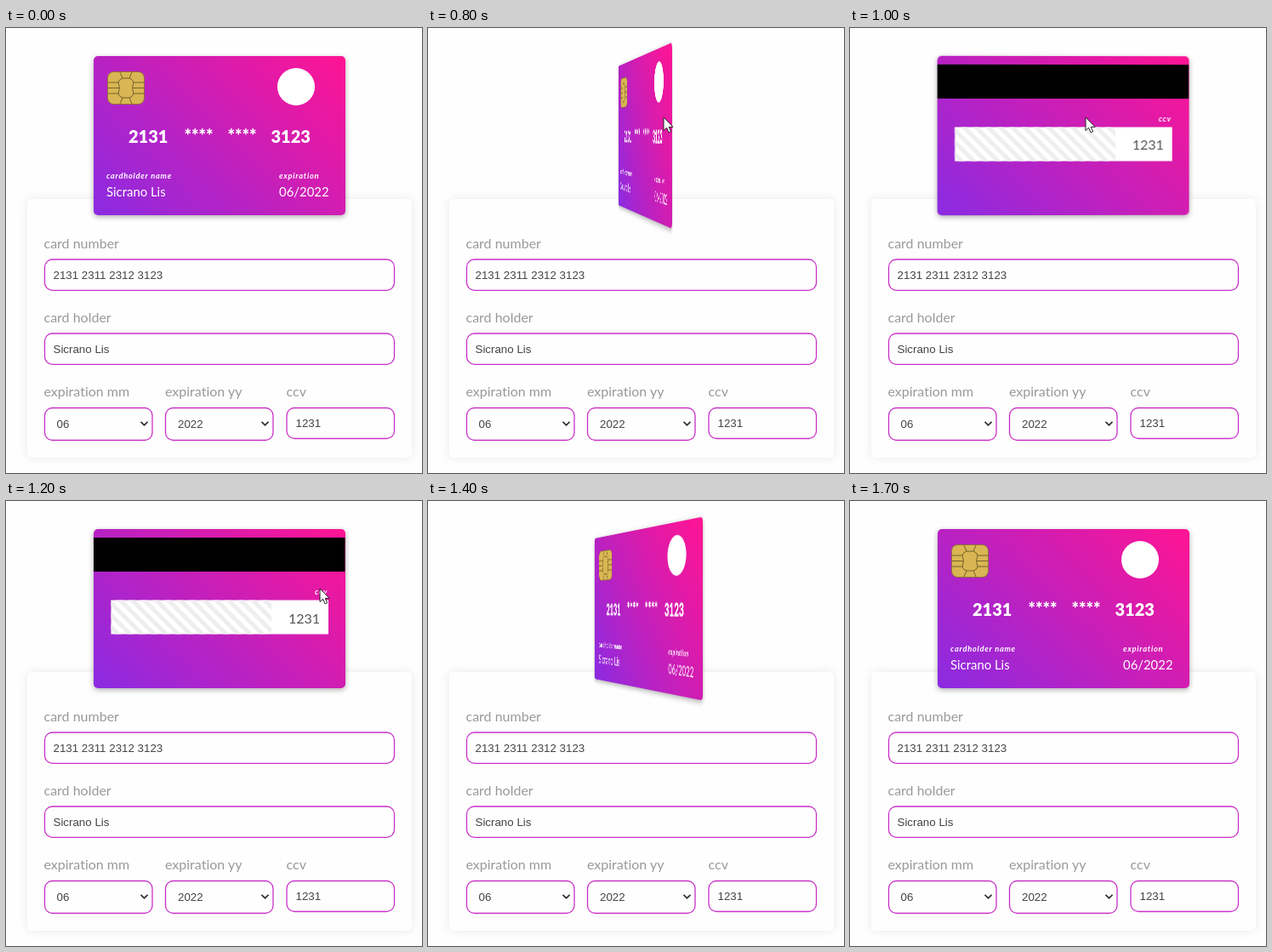
An HTML page for the animation above (3.1 s loop, 489 by 523 pixels).

```html
<!DOCTYPE html>
<html lang="en">
<head>
<meta charset="utf-8">
<title>Card form</title>
<style>
  html, body { margin: 0; width: 100%; height: 100%; overflow: hidden; background: #fefefe; }
  svg { position: absolute; left: 0; top: 0; display: block; }
  text { font-family: Lato, sans-serif; font-variant-ligatures: none; }
  .panel {
    position: absolute; left: 25px; top: 201px; width: 452px; height: 304px;
    border-radius: 5px; background: #fefefe; box-shadow: 0 0 12px rgba(0, 0, 0, .09);
  }
  .label text { font-size: 16px; fill: #999; }
  .field rect { fill: #fefefe; stroke: #c930c8; stroke-width: 1.3; }
  .field text { font: 13.333px "Liberation Sans", Arial, sans-serif; fill: #444; }
  .field path { fill: none; stroke: #333; stroke-width: 1.8; }
  .card {
    position: absolute; left: 103px; top: 33px; width: 295.5px; height: 187px;
    transform-style: preserve-3d;
  }
  .face {
    position: absolute; inset: 0; border-radius: 5px; backface-visibility: hidden;
    background: linear-gradient(45deg, #8a2be2, #ff1493);
    box-shadow: 0 2px 6px rgba(0, 0, 0, .32);
  }
  .back { transform: rotateY(180deg); }
  .face text { fill: #fff; }
  .face .num { font-size: 20px; font-weight: 900; }
  .face .tiny { font-size: 9.3px; font-weight: 700; font-style: italic; letter-spacing: .75px; }
  .face .info { font-size: 14.9px; }
  .face .code { font-size: 16px; fill: #555; }
  .cursor { visibility: hidden; }
</style>
</head>
<body>
<div class="panel"></div>

<svg width="489" height="523">
  <g class="label">
    <text x="44.5" y="258.5">card number</text>
    <text x="44.5" y="345.5">card holder</text>
    <text x="44.5" y="432.5">expiration mm</text>
    <text x="187" y="432.5">expiration yy</text>
    <text x="329.5" y="432.5">ccv</text>
  </g>
  <g class="field">
    <rect x="45.5" y="272" width="411" height="36.3" rx="9"/>
    <rect x="45.5" y="359" width="411" height="36.3" rx="9"/>
    <rect x="45.5" y="446.5" width="126.5" height="38" rx="9"/>
    <rect x="187.5" y="446.5" width="126.5" height="38" rx="9"/>
    <rect x="330" y="446.5" width="126.5" height="36" rx="9"/>
    <text x="55.5" y="294.5">2131 2311 2312 3123</text>
    <text x="55.5" y="381.5">Sicrano Lis</text>
    <text x="59.5" y="469.5">06</text>
    <text x="202" y="469.5">2022</text>
    <text x="340.5" y="469">1231</text>
    <path d="M158.5 462.8l4 4 4-4M300.5 462.8l4 4 4-4"/>
  </g>
</svg>

<div class="card" id="card">
  <div class="face">
    <svg width="295.5" height="187" viewBox="103 33 295.5 187">
      <rect x="119.5" y="51.5" width="43" height="38" rx="7" fill="#d9b653" stroke="#8d7138"/>
      <g fill="none" stroke="#75602c" stroke-width="1">
        <path d="M120 64h12M120 77h12M120 70.5h13M162 64h-12M162 77h-12M162 70.5h-13"/>
        <path d="M132 64q1-4 5-5l-3-7M150 64q-1-4-5-5l3-7M132 77q1 4 5 5l-3 7M150 77q-1 4-5 5l3 7"/>
        <path d="M132 64q3 6.5 0 13M150 64q-3 6.5 0 13M137 59h8M137 82h8"/>
      </g>
      <circle cx="341" cy="69" r="22" fill="#fff"/>
      <g class="num">
        <text x="144" y="135">2131</text>
        <text x="209.5" y="134">****</text>
        <text x="260.5" y="134">****</text>
        <text x="311.5" y="135">3123</text>
      </g>
      <text class="tiny" x="118" y="177">cardholder name</text>
      <text class="tiny" x="321" y="177">expiration</text>
      <text class="info" x="118" y="198">Sicrano Lis</text>
      <text class="info" x="321" y="198">06/2022</text>
    </svg>
  </div>
  <div class="face back">
    <svg width="295.5" height="187" viewBox="103 33 295.5 187">
      <defs>
        <pattern id="hatch" width="10" height="10" patternUnits="userSpaceOnUse" patternTransform="rotate(-45)">
          <rect width="5" height="10" fill="#eee"/>
        </pattern>
      </defs>
      <rect x="103" y="43" width="295.5" height="40"/>
      <text class="tiny" x="363" y="110">ccv</text>
      <rect x="123.5" y="116.5" width="255.5" height="40" fill="#fff"/>
      <rect x="123.5" y="116.5" width="188.5" height="40" fill="url(#hatch)"/>
      <text class="code" x="332" y="143.5">1231</text>
    </svg>
  </div>
</div>

<svg width="489" height="523">
  <path class="cursor" id="cursor" d="M0 0V15.5L3.6 12.2L6 17.8L8.6 16.7L6.2 11.3H11Z"
    fill="#fff" stroke="#222" stroke-width="1" stroke-linejoin="round"/>
</svg>

<script>
  const LOOP = 3100;
  // start time, card angle, cursor position (absent when off the card)
  const steps = [
    [0, 0],
    [700, -35.5, 300, 98],
    [800, -78, 277, 105],
    [900, -135, 277, 105],
    [1000, -179, 277, 105],
    [1100, -180, 318, 105],
    [1200, -180, 369, 103],
    [1300, -115],
    [1400, -65],
    [1500, -30],
    [1600, -8],
    [1700, 0]
  ];
  const card = document.getElementById('card');
  const cursor = document.getElementById('cursor');
  const start = performance.now();

  function draw(now) {
    const t = Math.max(0, now - start) % LOOP;
    const [, angle, x, y] = steps.filter(s => s[0] <= t).pop();
    card.style.transform = `perspective(1000px) rotateY(${angle}deg)`;
    cursor.style.visibility = x ? 'visible' : 'hidden';
    if (x) cursor.setAttribute('transform', `translate(${x} ${y})`);
    requestAnimationFrame(draw);
  }
  draw(start);
</script>
</body>
</html>
```
